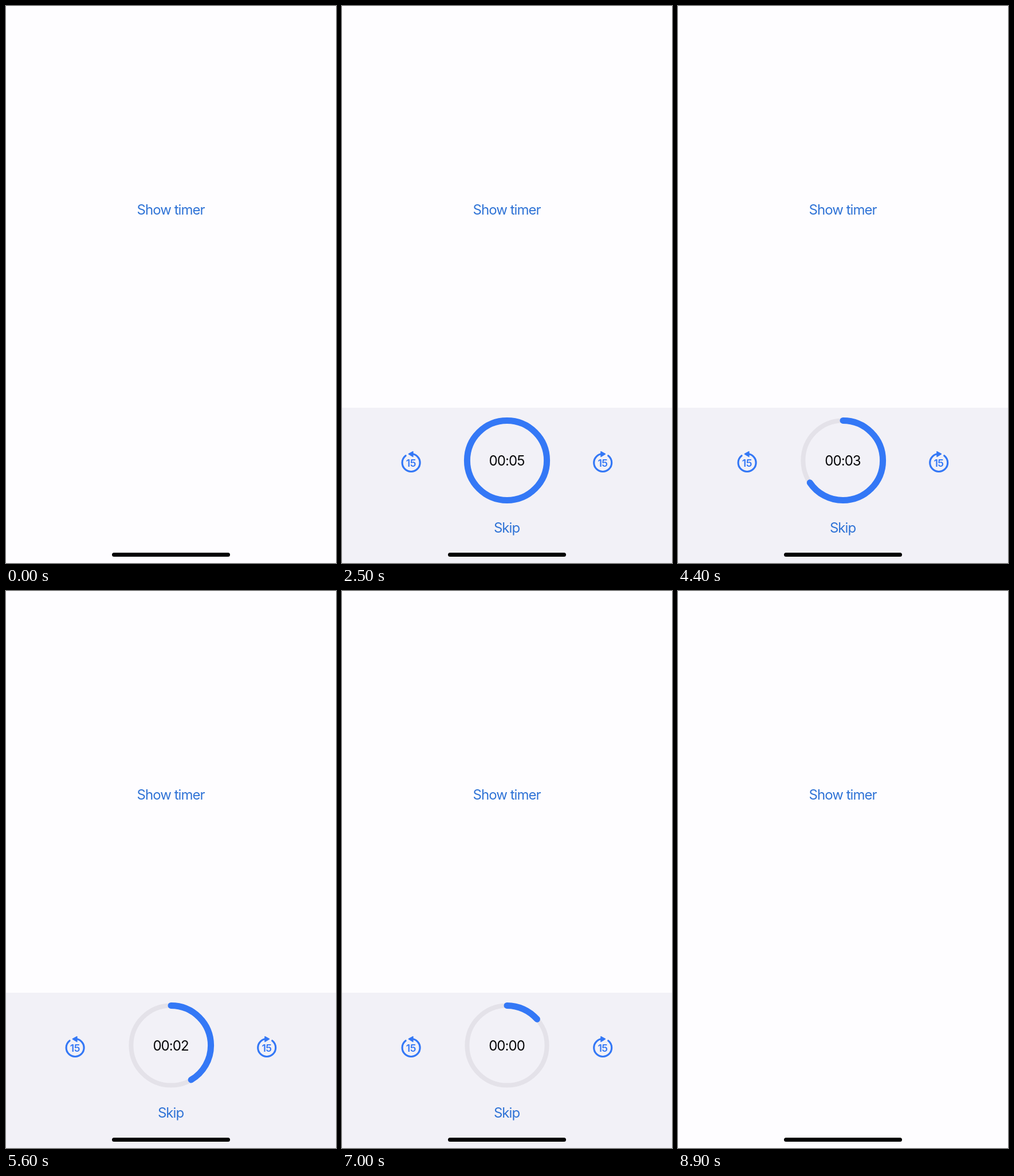
An HTML page with a canvas that plays this animation: 576 by 972 pixels, repeating every 9.1 s.

```html
<!DOCTYPE html>
<html lang="en">
<head>
<meta charset="utf-8">
<title>Timer panel</title>
<style>
html, body { margin: 0; width: 100%; height: 100%; overflow: hidden; background: #fefdff; }
canvas { display: block; width: 576px; height: 972px; }
</style>
</head>
<body>
<canvas id="stage" width="576" height="972"></canvas>
<script>
const ctx = document.getElementById('stage').getContext('2d');
const W = 576, H = 972, LOOP = 9100;
const PANEL_TOP = 701, CX = 288, CY = 793;
const BLUE = '#3478f6', LINK = '#2f73d6';

const SHOW = 1680, HIDE = 7680, SLIDE = 350;
const FIRST_TICK = 2680, SECONDS = 5;

const clamp = x => Math.min(1, Math.max(0, x));
const ease = x => 0.5 - 0.5 * Math.cos(Math.PI * clamp(x));
const span = (t, from, to) => ease((t - from) / (to - from));

function label(text, x, y, color, size = 24, weight = 400, spacing = -0.95) {
  ctx.font = `${weight} ${size}px Inter, "Liberation Sans", sans-serif`;
  ctx.letterSpacing = spacing + 'px';
  ctx.textAlign = 'center';
  ctx.fillStyle = color;
  ctx.fillText(text, x + spacing / 2, y);
}

function arc(x, y, r, from, to, width, color, cap = 'butt') {
  ctx.beginPath();
  ctx.arc(x, y, r, from, to);
  ctx.lineWidth = width;
  ctx.lineCap = cap;
  ctx.strokeStyle = color;
  ctx.stroke();
}

// dir: 1 = arrow to the left (back), -1 = mirrored (forward)
function jumpIcon(x, y, dir) {
  ctx.save();
  ctx.translate(x, y);
  ctx.save();
  ctx.scale(dir, 1);
  arc(0, 0, 15.5, -Math.PI / 2, Math.PI * 1.29, 3.2, BLUE, 'round');
  ctx.beginPath();
  ctx.moveTo(-4.2, -15.2);
  ctx.lineTo(3.2, -19.4);
  ctx.lineTo(3.2, -10.6);
  ctx.closePath();
  ctx.lineJoin = 'round';
  ctx.lineWidth = 1.6;
  ctx.fillStyle = BLUE;
  ctx.fill();
  ctx.stroke();
  ctx.restore();
  label('15', 0, 6.8, BLUE, 17.5, 600, -0.5);
  ctx.restore();
}

function ring(left) {
  arc(CX, CY, 69.6, 0, Math.PI * 2, 8, '#e4e2e9');
  if (left > 0) {
    const top = -Math.PI / 2;
    arc(CX, CY, 69.6, top, top + Math.PI * 2 * left, 11, BLUE, 'round');
  }
}

function panel(t) {
  const open = span(t, SHOW, SHOW + SLIDE) - span(t, HIDE, HIDE + SLIDE);
  const dy = (1 - open) * (H - PANEL_TOP);
  const passed = (t - FIRST_TICK) / 1000;
  const seconds = Math.max(0, Math.min(SECONDS, SECONDS - 1 - Math.floor(passed)));

  ctx.save();
  ctx.translate(0, dy);
  ctx.fillStyle = '#f2f1f7';
  ctx.fillRect(0, PANEL_TOP, W, H - PANEL_TOP);
  ring(clamp(1 - passed / SECONDS));
  jumpIcon(120.6, 797, 1);
  jumpIcon(455.2, 797, -1);
  label('Skip', CX, 919, LINK);
  ctx.restore();

  // the digits are in place at once and only leave with the panel
  label('00:0' + seconds, CX, 802 + (t < HIDE ? 0 : dy), '#08080a');
}

function draw(t) {
  ctx.fillStyle = '#fefdff';
  ctx.fillRect(0, 0, W, H);

  const pressed = span(t, 1350, 1600) - span(t, SHOW, 2150);
  ctx.globalAlpha = 1 - 0.72 * pressed;
  label('Show timer', CX, 364, LINK);
  ctx.globalAlpha = 1;

  if (t >= SHOW && t < HIDE + SLIDE) panel(t);

  ctx.fillStyle = '#000';
  ctx.beginPath();
  ctx.roundRect(185, 954, 206, 7, 3.5);
  ctx.fill();
}

const start = performance.now();
function frame() {
  draw((performance.now() - start) % LOOP);
  requestAnimationFrame(frame);
}
frame();
</script>
</body>
</html>
```
